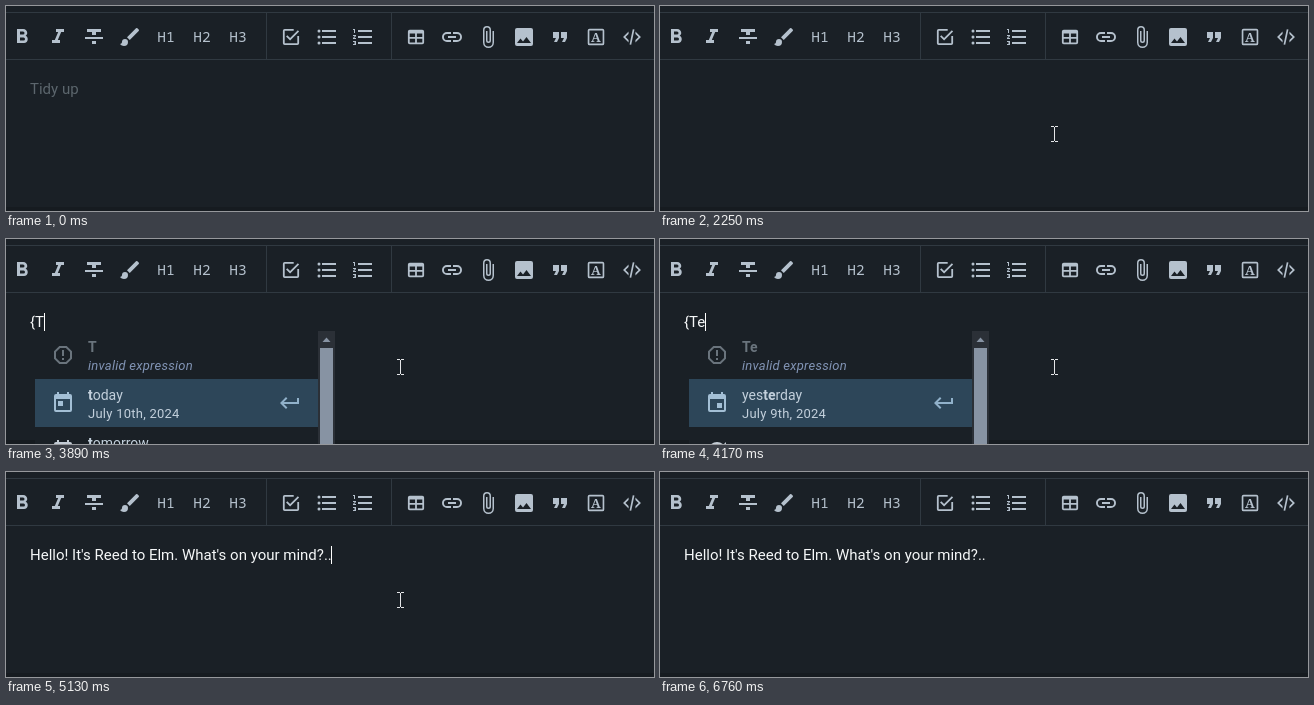
An HTML page for the animation above (7110 ms loop, 648 by 205 pixels).

```html
<!DOCTYPE html>
<html lang="en">
<head>
<meta charset="utf-8">
<title>Note editor</title>
<style>
html, body { margin: 0; width: 100%; height: 100%; overflow: hidden; background: #1a2026; }
svg { display: block; font-family: Roboto, sans-serif; }
text { white-space: pre; }
.icons { fill: #b5c1cd; }
.heading { font: 500 14.5px "Noto Sans Mono", monospace; text-anchor: middle; }
.letter { font: bold 13px "Noto Serif", serif; text-anchor: middle; }
.body { font-size: 15px; }
.title { font-size: 14px; }
.sub { font-size: 13px; letter-spacing: .25px; }
</style>
</head>
<body>
<svg id="stage" width="648" height="205" viewBox="0 0 648 205"></svg>
<script>
const LOOP = 7110;
const GREETING = "Hello! It's Reed to Elm. What's on your mind?..";

const calendar = "M19 3h-1V1h-2v2H8V1H6v2H5a2 2 0 0 0-2 2v14a2 2 0 0 0 2 2h14a2 2 0 0 0 2-2V5a2 2 0 0 0-2-2zm0 16H5V8h14z";
const icons = {
  bold: "M15.6 10.8c1-.7 1.65-1.8 1.65-2.8 0-2.26-1.75-4-4-4H7v14h7.04c2.1 0 3.7-1.7 3.7-3.8 0-1.5-.85-2.8-2.14-3.4zM10 6.5h3a1.5 1.5 0 0 1 0 3h-3zm3.5 9H10v-3h3.5a1.5 1.5 0 0 1 0 3z",
  italic: "M10 4v3h2.2l-3.4 8H6v3h8v-3h-2.2l3.4-8H18V4z",
  strike: "M10 19h4v-3h-4zM5 4v3h5v3h4V7h5V4zM3 14h18v-2H3z",
  brush: "M7 14a3 3 0 0 0-3 3c0 1.3-1.16 2-2 2 .92 1.22 2.5 2 4 2a4 4 0 0 0 4-4 3 3 0 0 0-3-3zm13.7-9.4-1.3-1.3a1 1 0 0 0-1.4 0l-9 8.95L11.75 15l8.95-9a1 1 0 0 0 0-1.4z",
  check: "M19 19H5V5h10V3H5a2 2 0 0 0-2 2v14a2 2 0 0 0 2 2h14a2 2 0 0 0 2-2v-8h-2zM7.9 10.1l-1.4 1.4L11 16 21 6l-1.4-1.4-8.6 8.6z",
  bullets: "M2.5 6a1.5 1.5 0 0 1 3 0 1.5 1.5 0 0 1-3 0zm0 6a1.5 1.5 0 0 1 3 0 1.5 1.5 0 0 1-3 0zm0 6a1.5 1.5 0 0 1 3 0 1.5 1.5 0 0 1-3 0zM7 5h14v2H7zm0 6h14v2H7zm0 6h14v2H7z",
  numbers: "M2 17h2v.5H3v1h1v.5H2v1h3v-4H2zm1-9h1V4H2v1h1zm-1 3h1.8L2 13.1v.9h3v-1H3.2L5 10.9V10H2zm5-6v2h14V5zm0 14h14v-2H7zm0-6h14v-2H7z",
  table: "M5 4h14a2 2 0 0 1 2 2v12a2 2 0 0 1-2 2H5a2 2 0 0 1-2-2V6a2 2 0 0 1 2-2zm0 4v4h6V8zm8 0v4h6V8zm-8 6v4h6v-4zm8 0v4h6v-4z",
  link: "M3.9 12A3.1 3.1 0 0 1 7 8.9h4V7H7a5 5 0 0 0 0 10h4v-1.9H7A3.1 3.1 0 0 1 3.9 12zM8 13h8v-2H8zm9-6h-4v1.9h4a3.1 3.1 0 0 1 0 6.2h-4V17h4a5 5 0 0 0 0-10z",
  clip: "M16.5 6v11.5a4 4 0 0 1-8 0V5a2.5 2.5 0 0 1 5 0v10.5a1 1 0 0 1-2 0V6H10v9.5a2.5 2.5 0 0 0 5 0V5a4 4 0 0 0-8 0v12.5a5.5 5.5 0 0 0 11 0V6z",
  image: "M21 19V5a2 2 0 0 0-2-2H5a2 2 0 0 0-2 2v14a2 2 0 0 0 2 2h14a2 2 0 0 0 2-2zM8.5 13.5l2.5 3 3.5-4.5 4.5 6H5z",
  quote: "M6 17h3l2-4V7H5v6h3zm8 0h3l2-4V7h-6v6h3z",
  frame: "M5 3h14a2 2 0 0 1 2 2v14a2 2 0 0 1-2 2H5a2 2 0 0 1-2-2V5a2 2 0 0 1 2-2zm-.2 1.8v14.4h14.4V4.8z",
  code: "M12.9 3l1.95.4L11.1 21l-1.95-.4zM19.6 12 16 8.4V5.6l6.4 6.4-6.4 6.4v-2.8zM1.6 12 8 5.6v2.8L4.4 12 8 15.6v2.8z",
  today: calendar + "M7 10h5v5H7z",
  event: calendar + "M12 12h5v5h-5z",
  alert: "M8.3 3h7.4L21 8.3v7.4L15.7 21H8.3L3 15.7V8.3zM9.1 5 5 9.1v5.8L9.1 19h5.8l4.1-4.1V9.1L14.9 5zM11 7h2v6h-2zm0 8h2v2h-2z",
  toc: "M3 3h18v3H3zm0 6h18v3H3z",
  cycle: "M12 3a9 9 0 1 0 9 9h-2a7 7 0 1 1-2-5l-3 3h7V3l-2.6 2.6A9 9 0 0 0 12 3z",
  enter: "M19 7v4H5.8l3.6-3.6L8 6l-6 6 6 6 1.4-1.4L5.8 13H21V7z"
};

const rect = (x, y, w, h, fill) => `<rect x="${x}" y="${y}" width="${w}" height="${h}" fill="${fill}"/>`;
const label = (x, y, cls, text, extra = "") => `<text x="${x}" y="${y}" class="${cls}" ${extra}>${text}</text>`;
const icon = (name, cx, cy, scale = 1, extra = "") =>
  `<path d="${icons[name]}" fill-rule="evenodd" transform="translate(${cx} ${cy}) scale(${scale}) translate(-12 -12)" ${extra}/>`;
const bold = text => `<tspan font-weight="700">${text}</tspan>`;

function toolbar() {
  const scales = { check: .9, table: .9, frame: .92, code: .86 };
  const group = (x, names) => names.map((name, i) => {
    const cx = x + i * 36;
    return /^H\d/.test(name) ? label(cx, 36, "heading", name) : icon(name, cx, 31, scales[name]);
  }).join("");
  const line = "#303941";
  return rect(0, 6, 648, 1, line) + rect(0, 53, 648, 1, line) +
    rect(260, 7, 1, 46, line) + rect(385, 7, 1, 46, line) +
    `<g class="icons">` +
    group(16, ["bold", "italic", "strike", "brush", "H1", "H2", "H3"]) +
    group(285, ["check", "bullets", "numbers"]) +
    group(410, ["table", "link", "clip", "image", "quote", "frame", "code"]) +
    label(590, 35.7, "letter", "A") + `</g>`;
}

function row(index, [symbol, title, sub], selected) {
  const top = 92 + index * 48;
  const invalid = symbol === "alert";
  const tint = invalid ? "#6a747d" : selected ? "#a3bfd5" : "#c3ccd5";
  return (selected ? rect(29, top, 283, 48, "#2d4659") + icon("enter", 284, top + 24, 1, `fill="#91b1ca"`) : "") +
    icon(symbol, 57, top + 24, 1, `fill="${tint}"`) +
    label(82, top + (sub ? 21 : 29), "title", title, `fill="${invalid ? tint : "#c3d0dc"}"`) +
    (sub ? label(82, top + 39, "sub", sub, invalid ? `fill="#8294b5" font-style="italic"` : `fill="#c3d0dc"`) : "");
}

function menu(rows, active) {
  return rect(29, 92, 300, 113, "#1a2026") +
    rows.map((item, i) => row(i, item, i === active)).join("") +
    rect(312, 92, 17, 113, "#2b3037") +
    `<path d="M316.5 103l4-4.5 4 4.5z" fill="#8793a3"/>` +
    rect(314, 109, 13, 96, "#8793a3");
}

const invalid = text => ["alert", bold(text), "invalid expression"];
const menus = {
  all: menu([
    ["today", bold("today"), "July 10th, 2024"],
    ["event", bold("tomorrow"), "July 11th, 2024"],
    ["toc", bold("toc"), "table of contents"]], 0),
  T: menu([
    invalid("T"),
    ["today", bold("t") + "oday", "July 10th, 2024"],
    ["event", bold("t") + "omorrow", "July 11th, 2024"]], 1),
  Te: menu([
    invalid("Te"),
    ["event", "yes" + bold("te") + "rday", "July 9th, 2024"],
    ["cycle", bold("te") + "mplate"]], 1),
  Tem: menu([
    invalid("Tem"),
    ["cycle", bold("tem") + "plate"],
    ["cycle", bold("tem") + "plate"]], 1),
  none: ""
};

// Each entry holds from its time until the next one.
const typed = [[0, "Tidy up"], [690, ""], [2880, "{"], [3890, "{T"], [4100, "{Te"], [4450, "{Tem"], [5000, GREETING]];
const opened = [[0, "none"], [2880, "all"], [3890, "T"], [4170, "Te"], [4520, "Tem"], [5000, "none"]];
const caretX = [[0, null], [690, 24], [1240, null], [1790, 24], [2250, null], [2880, 29], [3360, null],
  [3890, 38], [4100, 45], [4450, 58], [5000, 325], [5660, null], [6200, 325], [6760, null]];
const at = (track, t) => track.findLast(([start]) => t >= start)[1];

function pointerAt(t) {
  if (t < 210 || t >= 6760) return null;
  if (t < 410) {
    const left = 1 - Math.floor((t - 210) / 66.7) / 3;
    return [396 + 8 * left, 131 + 66 * left * left];
  }
  if (t < 620) return [396, 131];
  if (t < 6200) return [394, 128];
  const p = (Math.floor((t - 6200) / 70) + 1) / 9;
  return [394 + 14 * p, 128 + 86 * p * p];
}

const stage = document.getElementById("stage");
stage.innerHTML = rect(0, 0, 648, 205, "#1a2026") + rect(0, 201, 648, 4, "#161b20") + toolbar() +
  label(24, 88, "body", "", `id="line"`) +
  `<g id="menu"></g>` +
  `<rect id="caret" y="74" width="1" height="18" fill="#fff"/>` +
  `<path id="pointer" d="M-3 -7.5h3M1 -7.5h3M.5 -7V7M-3 7.5h3M1 7.5h3" fill="none" stroke="#e4e6e8"/>`;
const [lineEl, menuEl, caretEl, pointerEl] = ["line", "menu", "caret", "pointer"].map(id => document.getElementById(id));

let shownMenu = "none";
function render(t) {
  lineEl.textContent = at(typed, t);
  lineEl.setAttribute("fill", t < 690 ? "#5c666d" : "#f5f7f8");

  const name = at(opened, t);
  if (name !== shownMenu) menuEl.innerHTML = menus[shownMenu = name];

  const x = at(caretX, t);
  caretEl.setAttribute("visibility", x === null ? "hidden" : "visible");
  if (x !== null) caretEl.setAttribute("x", x);

  const pos = pointerAt(t);
  pointerEl.setAttribute("visibility", pos ? "visible" : "hidden");
  if (pos) pointerEl.setAttribute("transform", `translate(${pos.map(Math.round)})`);
}

const start = performance.now();
function tick() {
  render((performance.now() - start) % LOOP);
  requestAnimationFrame(tick);
}
tick();
</script>
</body>
</html>
```
